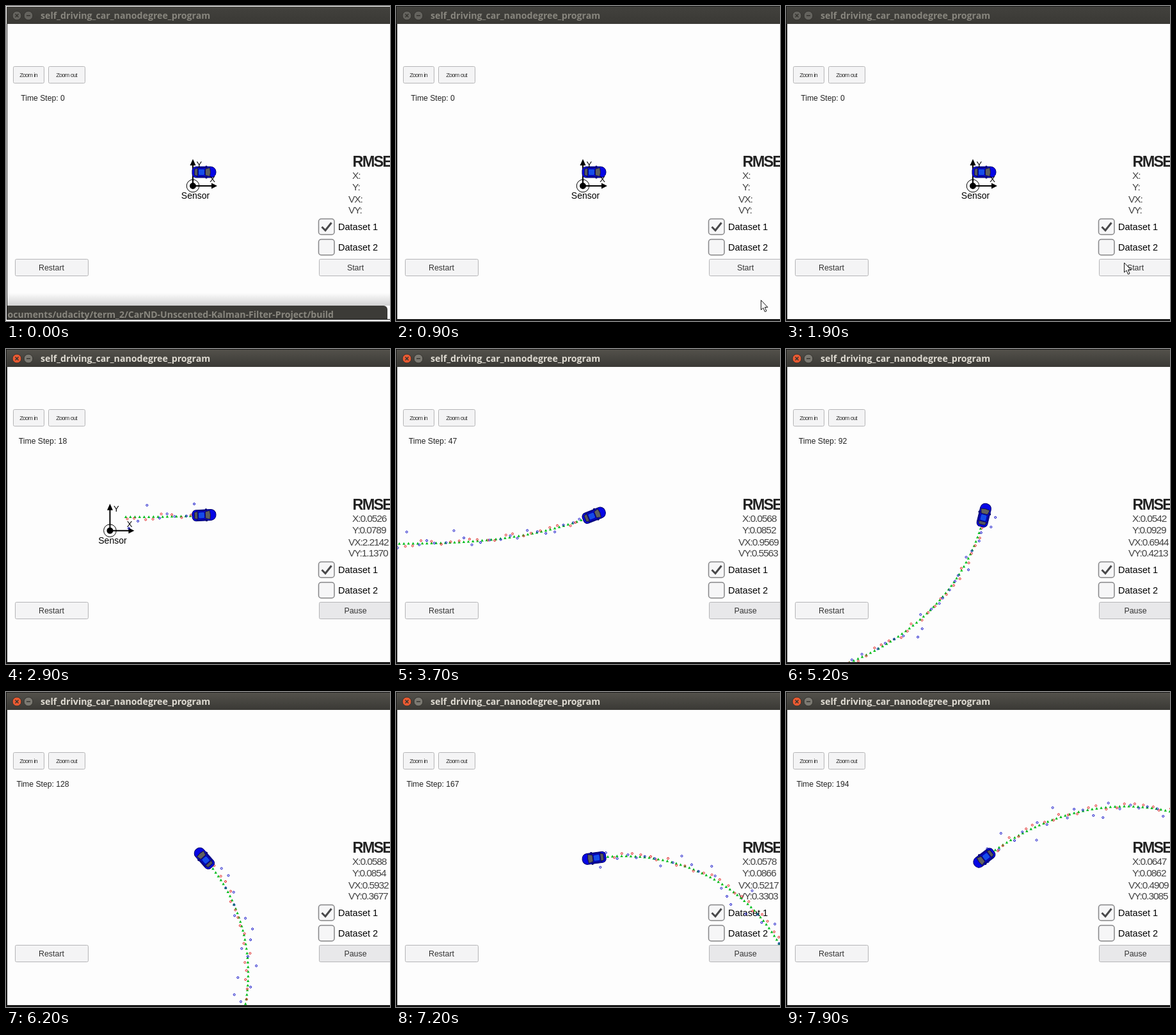
These frames come from a looping animation (600x492 px, 8000 ms). An HTML page with a canvas:

```html
<!DOCTYPE html>
<html lang="en">
<head>
<meta charset="utf-8">
<style>
html, body { margin: 0; width: 600px; height: 492px; overflow: hidden; }
canvas { display: block; }
</style>
</head>
<body>
<canvas id="stage" width="600" height="492"></canvas>
<script>
const ctx = document.getElementById('stage').getContext('2d');
const SANS = '"Liberation Sans", Arial, sans-serif';
const TITLE = '"Open Sans", "Noto Sans", sans-serif';
const LOOP = 8000, RUN = 2500, STRIDE = 7.2;
const CAR = { x: 309.5, y: 259.5 };

// time, step, RMSE of x, y, vx, vy
const runKeys = [
  [2400, 0, .05, .075, 3, 1.5],
  [3700, 47, .0568, .0852, .9569, .5563],
  [5200, 92, .0542, .0929, .6944, .4213],
  [6200, 128, .0588, .0854, .5932, .3677],
  [7200, 167, .0578, .0866, .5217, .3303],
  [7900, 194, .0647, .0862, .4909, .3085]
];

const clamp = v => Math.max(0, Math.min(1, v));

function sample(keys, at) {
  let i = 1;
  while (i < keys.length - 1 && keys[i][0] < at) i++;
  const a = keys[i - 1], b = keys[i];
  const k = clamp((at - a[0]) / (b[0] - a[0]));
  return a.map((v, j) => v + (b[j] - v) * k);
}

// seeded value from -1 to 1
const noise = i => {
  const v = Math.sin(i * 78.233) * 43758.5453;
  return (v - Math.floor(v)) * 2 - 1;
};

// the car turns left, sharpest in the middle of the bend
const heading = i => 119 * (1 - Math.cos(Math.PI * i / 240)) * Math.PI / 180;

const path = [{ x: 0, y: 0, a: 0 }];
for (let i = 1; i < 200; i++) {
  const a = heading(i), p = path[i - 1];
  path.push({ x: p.x + STRIDE * Math.cos(a), y: p.y - STRIDE * Math.sin(a), a });
}

function text(s, x, y, size, { color = '#222', align = 'left', weight = '', face = SANS, gap = 0 } = {}) {
  ctx.font = `${weight} ${size}px ${face}`;
  ctx.fillStyle = color;
  ctx.textAlign = align;
  ctx.letterSpacing = gap + 'px';
  ctx.wordSpacing = -gap + 'px';
  ctx.fillText(s, x, y);
}

function box(x, y, w, h, r, fill, stroke, line = 1) {
  ctx.beginPath();
  ctx.roundRect(x, y, w, h, r);
  paint(fill, stroke, line);
}

function poly(points, fill, stroke) {
  ctx.beginPath();
  points.forEach(p => ctx.lineTo(...p));
  ctx.closePath();
  paint(fill, stroke);
}

function disc(x, y, r, fill, stroke) {
  ctx.beginPath();
  ctx.arc(x, y, r, 0, 7);
  paint(fill, stroke);
}

function paint(fill, stroke, line = 1) {
  if (fill) { ctx.fillStyle = fill; ctx.fill(); }
  if (stroke) { ctx.strokeStyle = stroke; ctx.lineWidth = line; ctx.stroke(); }
}

function lines(color, width, ...paths) {
  ctx.beginPath();
  for (const [first, ...rest] of paths) {
    ctx.moveTo(...first);
    rest.forEach(p => ctx.lineTo(...p));
  }
  paint(null, color, width);
}

function titleBar(active) {
  const g = ctx.createLinearGradient(0, 1, 0, 28);
  g.addColorStop(0, active ? '#53514b' : '#42413d');
  g.addColorStop(1, '#3a3935');
  ctx.fillStyle = g;
  ctx.fillRect(1, 1, 599, 27);
  disc(17, 15, 7, active ? '#ea5a32' : '#64635e', '#32312d');
  disc(35, 15, 7, active ? '#7b7972' : '#64635e', '#32312d');
  lines('#34332f', 1.5, [[14.5, 12.5], [19.5, 17.5]], [[19.5, 12.5], [14.5, 17.5]], [[32, 15], [38, 15]]);
  text('self_driving_car_nanodegree_program', 54, 20, 14.2,
    { weight: 'bold', face: TITLE, color: active ? '#dfdbd2' : '#88867e' });
}

function button(label, x, y, w, size, gap, fill = '#f4f4f5') {
  box(x + .5, y + .5, w, 26, 2, fill, '#b5b5b7');
  text(label, x + w / 2, y + 14 + size * .36, size, { align: 'center', color: '#333', gap });
}

function checkbox(label, y, on) {
  box(488.5, y + .5, 24.5, 24.5, 4, '#f6f6f7', '#858587', 1.5);
  if (on) lines('#48484a', 3, [[493.5, y + 13], [499, y + 18.5], [508.5, y + 6.5]]);
  text(label, 519, y + 17.5, 14.5, { color: '#000' });
}

function readings(n, errors, running) {
  text('Time Step: ' + n, 57.5, 148, 12.2, { align: 'center' });
  text('RMSE', 541.5, 250.5, 23.5, { weight: 'bold', gap: -1.8 });
  const rows = [['X:', 541, 269.5], ['Y:', 541, 287.5], ['VX:', 535, 306.5], ['VY:', 535, 324]];
  rows.forEach(([label, x, y], i) =>
    text(label + (running ? errors[i].toFixed(4) : ''), x, y, 15.5, { color: '#444', gap: -1.1 }));
  checkbox('Dataset 1', 332, true);
  checkbox('Dataset 2', 364, false);
}

function buttons(running) {
  button('Zoom in', 11, 94, 48, 9.4, -1.05);
  button('Zoom out', 66, 94, 57, 9.4, -1.05);
  button('Restart', 14, 395, 114, 12.4);
  if (running) button('Pause', 489, 395, 114, 12.4, 0, '#e8e8ea');
  else button('Start', 489, 395, 114, 12.4);
}

function sensor() {
  ctx.save();
  ctx.translate(-17.5, 21.5);
  lines('#000', 2, [[0, 0], [0, -34]], [[0, 0], [32, 0]]);
  poly([[0, -42], [-4.5, -32], [4.5, -32]], '#000');
  poly([[38, 0], [29, -4.5], [29, 4.5]], '#000');
  disc(0, 0, 9.8, null, '#000');
  disc(0, 0, 5, '#000');
  text('Sensor', 4, 20, 14, { align: 'center', color: '#000' });
  ctx.restore();
}

function axisLabels() {
  text('Y', -12, -8, 13, { color: '#000' });
  text('X', 17.5, 15.5, 13, { color: '#000', align: 'right' });
}

// one estimate per step, with lidar (red) and the wider radar (blue) in turn
function trail(n) {
  for (let i = 1; i <= n; i++) {
    const { x, y, a } = path[i], radar = i % 2 === 0;
    const side = noise(i) * (radar ? 20 * Math.abs(noise(i)) : 5);
    const ahead = noise(i + 300) * 3;
    poly([[x, y - 2.2], [x - 2.2, y + 1.8], [x + 2.2, y + 1.8]], '#00bd1c');
    disc(x + ahead * Math.cos(a) - side * Math.sin(a),
      y - ahead * Math.sin(a) - side * Math.cos(a), 1.5, null, radar ? '#0808c8' : '#e01c1c');
  }
}

function car(angle) {
  ctx.save();
  ctx.translate(CAR.x, CAR.y);
  ctx.rotate(-angle);
  box(-18.5, -8.5, 37, 17, [6, 8, 8, 6], '#0505e6', '#00006c');
  box(2, -10, 3, 2, 1, '#00006c');
  box(2, 8, 3, 2, 1, '#00006c');
  poly([[-15, -5], [-10, -6], [-10, 6], [-15, 5]], '#55565c', '#11114a');
  poly([[2, -5], [9, -7], [10, 0], [9, 7], [2, 5]], '#60605f', '#11114a');
  box(-9, -5, 10, 10, 2, '#154bea', '#0000a0');
  lines('#101050', 1, [[-12, -7], [5, -7]], [[-12, 7], [5, 7]]);
  ctx.restore();
}

function terminal(alpha) {
  ctx.globalAlpha = alpha;
  const g = ctx.createLinearGradient(0, 448, 0, 468);
  g.addColorStop(0, 'rgba(0,0,0,0)');
  g.addColorStop(1, 'rgba(0,0,0,.17)');
  ctx.fillStyle = g;
  ctx.fillRect(2, 448, 598, 20);
  box(2, 468, 594, 21, [0, 6, 0, 0], '#3c3b37');
  text('ocuments/udacity/term_2/CarND-Unscented-Kalman-Filter-Project/build', 512, 487, 14.1,
    { weight: 'bold', face: TITLE, color: '#88867e', align: 'right' });
  ctx.globalAlpha = 1;
}

function pointer(x, y) {
  ctx.save();
  ctx.translate(x, y);
  poly([[0, 0], [0, 15], [3.5, 12], [6, 18], [8.5, 17], [6, 11], [10.5, 11]], '#fff', '#111');
  ctx.restore();
}

function draw(t) {
  const running = t >= RUN;
  const [, step, ...errors] = sample(runKeys, t);
  const n = running ? Math.round(step) : 0;
  const at = path[n];

  // a white edge surrounds the window until the terminal leaves
  ctx.fillStyle = t < 200 ? '#fff' : '#161616';
  ctx.fillRect(0, 0, 600, 492);
  ctx.fillStyle = '#161616';
  ctx.fillRect(1, 1, 599, 489);
  ctx.fillStyle = '#fdfdfd';
  ctx.fillRect(2, 28, 598, 461);
  titleBar(running);

  ctx.save();
  ctx.beginPath();
  ctx.rect(2, 28, 598, 461);
  ctx.clip();
  readings(n, errors, running);
  ctx.save();
  ctx.translate(CAR.x - at.x, CAR.y - at.y);
  sensor();
  trail(n);
  ctx.restore();
  buttons(running);
  car(at.a);
  ctx.translate(CAR.x - at.x, CAR.y - at.y);
  axisLabels();
  ctx.restore();

  if (t < 400) terminal(t < 200 ? 1 : 1 - (t - 100) / 300);
  if (t >= 700 && !running) {
    const k = clamp((t - 700) / 600), e = k * k * (3 - 2 * k);
    pointer(585 - 56.5 * e, 480 - 79 * e);
  }
}

function frame() {
  // the screen refreshes ten times a second
  draw(Math.floor(performance.now() % LOOP / 100) * 100);
  requestAnimationFrame(frame);
}
frame();
</script>
</body>
</html>
```
